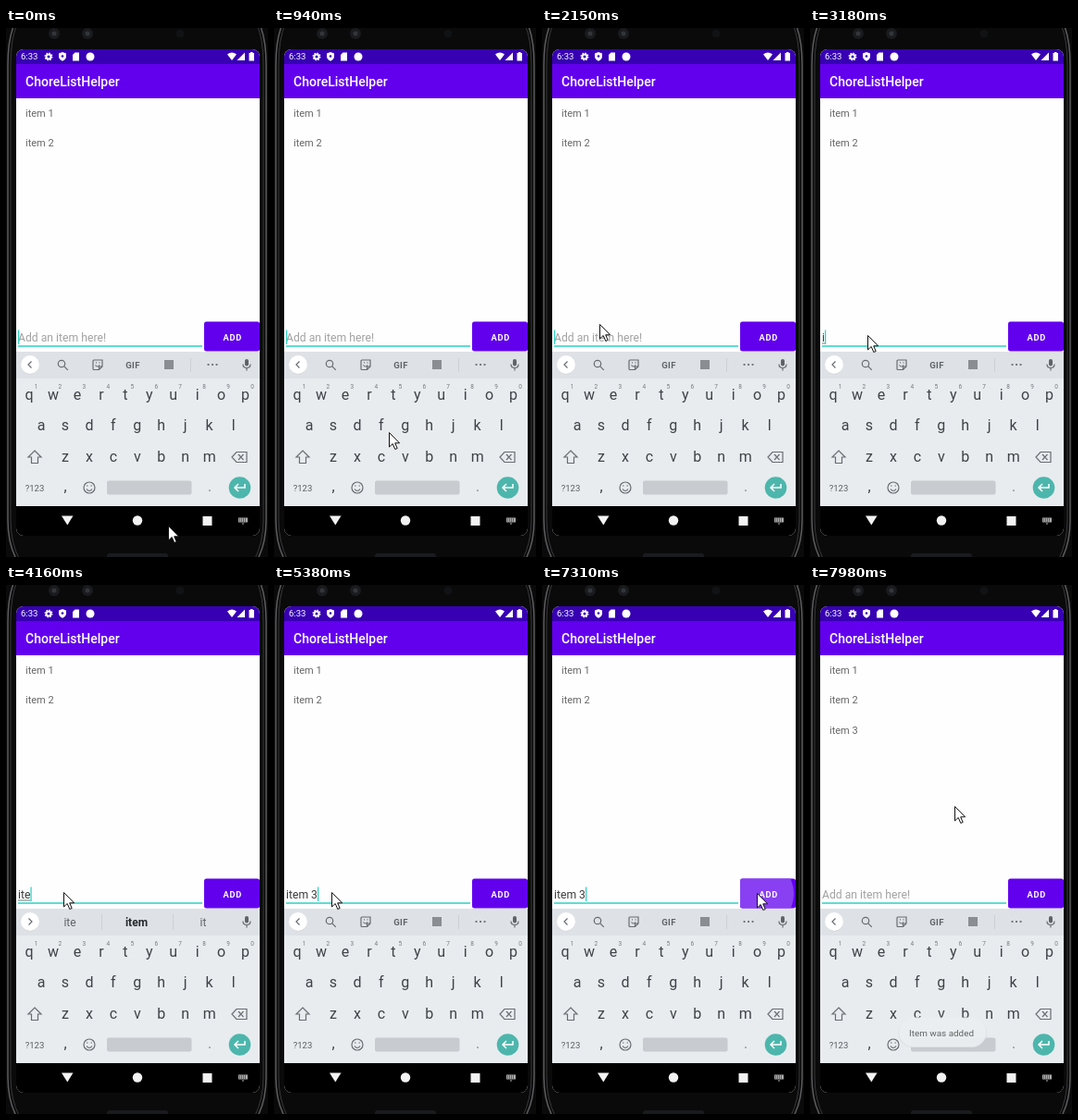
Animation, 283 px wide and 572 px high, one loop 8000 ms. Source, as an HTML page:

```html
<!DOCTYPE html>
<html lang="en">
<head>
<meta charset="utf-8">
<style>
html, body { margin: 0; width: 100%; height: 100%; overflow: hidden; background: #000 }
svg { display: block; width: 283px; height: 572px; font-family: Roboto, sans-serif }
.icon { fill: none; stroke: #686c71; stroke-width: 1.2 }
.key { font-size: 16px; fill: #3f4347; text-anchor: middle }
.mid { text-anchor: middle }
</style>
</head>
<body>
<svg viewBox="0 0 283 572">
  <defs>
    <clipPath id="screen"><rect x="11" y="23" width="263" height="526" rx="8"/></clipPath>
    <clipPath id="button"><rect x="214" y="317.500" width="60" height="32" rx="2.500"/></clipPath>
    <g id="edge" fill="none">
      <path d="M9-4Q2 12 2 40V532Q2 558 12 576" stroke="#5c5c5e" stroke-width="1.500"/>
      <path d="M12-4Q5 12 5 40V532Q5 556 15 576" stroke="#39393b"/>
    </g>
  </defs>

  <!-- phone body -->
  <path fill="#0a0a0b" d="M0 0h283v572H0z"/>
  <use href="#edge"/><use href="#edge" transform="matrix(-1 0 0 1 283 0)"/>
  <g fill="#1a1b1e">
    <circle cx="52" cy="6" r="6"/><circle cx="88" cy="6" r="6"/><circle cx="188" cy="6" r="4.500" fill="#111214"/>
    <rect x="109" y="568" width="66" height="9" rx="3"/>
  </g>
  <g fill="#33353a"><circle cx="52" cy="6" r="2.500"/><circle cx="88" cy="6" r="2.500"/></g>

  <g clip-path="url(#screen)">
    <path fill="#fefefe" d="M11 23h263v526H11z"/>
    <path fill="#3700b3" d="M11 23h263v16H11z"/>
    <path fill="#6200ee" d="M11 39h263v37H11z"/>
    <path fill="#e8ecef" d="M11 350h263v167H11z"/>
    <path fill="#dee2e6" d="M11 350h263v29H11z"/>
    <path fill="#000" d="M11 517h263v32H11z"/>

    <!-- status and title bar -->
    <g fill="#fff">
      <text x="16" y="34.300" font-size="9.500">6:33</text>
      <circle cx="46" cy="31" r="2.500" fill="none" stroke="#fff" stroke-width="2"/>
      <circle cx="46" cy="31" r="3.900" fill="none" stroke="#fff" stroke-width="1.200" stroke-dasharray="1.530"/>
      <path d="M61 26l4 1.500v3q0 3.500-4 5.300-4-1.800-4-5.300v-3z"/>
      <circle cx="61" cy="30.500" r="1.300" fill="#3700b3"/>
      <path d="M74.500 26.500h4.500v9h-7v-6.500z"/>
      <circle cx="91" cy="31" r="4.500"/>
      <path d="M239 28.500q5-4 10 0l-5 6.500zM258 26.500v8.500h-8.500zM264 26h2.500v1h1.500v8.500h-5.500v-8.500h1.500z"/>
      <text x="21" y="63" font-size="14" font-weight="500">ChoreListHelper</text>
    </g>

    <g font-size="11" fill="#666">
      <text x="21" y="96">item 1</text>
      <text x="21" y="128.300">item 2</text>
      <text x="21" y="160.500" id="added">item 3</text>
    </g>

    <!-- input row -->
    <path fill="#5fddd2" d="M13 343h199v2H13z"/>
    <text id="hint" x="13" y="339" font-size="12.200" fill="#a2a2a2">Add an item here!</text>
    <text id="typed" x="13" y="339" font-size="12.200" fill="#3c3c3c" xml:space="preserve"></text>
    <path id="underline" stroke="#555" stroke-width=".8"/>
    <path id="caret" fill="#35d3c4" d="M0 326.500h1.300v15.500H0z"/>
    <g clip-path="url(#button)">
      <path fill="#6200ee" d="M214 317h60v33h-60z"/>
      <circle id="ripple" cx="234" cy="334" fill="#8840f2"/>
    </g>
    <text x="244.700" y="337.500" class="mid" font-size="9.300" font-weight="700" letter-spacing=".7" fill="#fff">ADD</text>

    <!-- suggestion strip -->
    <circle cx="26" cy="364.500" r="10" fill="#c9cdd1"/>
    <circle cx="26" cy="364" r="10" fill="#fff"/>
    <path id="chevron" class="icon"/>
    <g id="tools" class="icon">
      <circle cx="60" cy="363" r="3.700"/><path d="M62.800 365.800l4 4"/>
      <path d="M95 359h9v7l-3.500 3.500H95q-1 0-1-1V360q0-1 1-1zM104 366h-3.500v3.500M96.500 364.500q2.300 3 4.600 0M97 361.800h1M100.500 361.800h1"/>
      <text x="137" y="367.500" class="mid" font-size="9.500" font-weight="700" letter-spacing=".4" fill="#5f6368" stroke="none">GIF</text>
      <path d="M171 359h10v10h-10z" fill="#8a8e93" stroke="none"/>
      <path d="M199.500 357v15" stroke="#cdd1d5" stroke-width="1"/>
      <path d="M218.500 364h.1M223 364h.1M227.500 364h.1" stroke-width="2.200" stroke-linecap="round"/>
    </g>
    <g id="words" class="mid" font-size="12" fill="#5f6368">
      <path d="M103.500 356v17M180.500 356v17" stroke="#cdd1d5"/>
      <text x="69" y="369"></text><text x="141" y="369" font-weight="700" fill="#26292c"></text><text x="213" y="369"></text>
    </g>
    <rect x="258" y="358" width="4" height="7.500" rx="2" fill="#5f6368"/>
    <path class="icon" d="M256 363.500q0 4 4 4t4-4M260 367.500v3"/>

    <!-- keyboard -->
    <g id="keys"></g>
    <g class="icon">
      <path d="M31 457l7 7h-3.500v6.500h-7V464H24z"/>
      <path d="M249 458.500h11v11h-11l-5-5.500zM251 461l5.500 6M256.500 461l-5.500 6"/>
      <circle cx="90" cy="497" r="6"/><path d="M87 498.500q3 4 6 0M87 495h1.500M91.500 495H93"/>
    </g>
    <text x="31" y="500.500" class="mid" font-size="9.500" fill="#5a5e62">?123</text>
    <text x="64" y="501" class="key">,</text>
    <text x="220" y="501" class="key" fill-opacity=".6">.</text>
    <rect x="109" y="489.500" width="91.500" height="15" rx="2" fill="#c8cbcf"/>
    <circle cx="252.500" cy="497" r="11.800" fill="#4db6ac"/>
    <path d="M258 493v4h-10.500M251 493l-4 4 4 4" fill="none" stroke="#fff" stroke-width="1.500"/>

    <!-- navigation bar -->
    <g fill="#f2f2f2">
      <path d="M60 527.500h12.500l-6.200 10z"/><circle cx="142" cy="532.500" r="5.200"/><path d="M212.500 528h10v10h-10z"/>
      <path d="M251 529.500h10v5h-10zM254.500 535.500h3l-1.500 1.500z" fill="#aaa"/>
      <path d="M252 531h8M252 533h8" stroke="#222" stroke-dasharray="1"/>
    </g>

    <g id="toast">
      <rect x="95.500" y="468" width="95.500" height="32" rx="16" fill="#d5d9dc"/>
      <rect x="96" y="467.500" width="94.500" height="32" rx="16" fill="#eceff1"/>
      <text x="142" y="488" class="mid" font-size="9.900" fill="#55585b">Item was added</text>
    </g>
  </g>
  <path id="pointer" d="M.500.500V16l3.700-3.500 2.600 6 2.400-1-2.500-5.700h4.900z" fill="#fff" stroke="#111"/>
</svg>
<script>
const LOOP = 8000, TICK = 134.2;
const PRESS = 7310, SUBMIT = 7580;
const STRIP_OPEN = 3710, STRIP_CLOSE = 5140;
const message = "item 3", keyTimes = [3180, 3860, 4160, 4310, 4740, 5140];

// Key points of the pointer: time, x, y.
const route = [
  [200, 175, 538], [550, 129, 456], [800, 129, 456], [930, 125, 438], [2010, 67, 308],
  [2140, 62, 320], [2400, 62, 332], [5800, 62, 332], [6480, 185, 355], [6780, 232, 333],
  [SUBMIT, 232, 333], [7900, 156, 239]];

const $ = id => document.getElementById(id);
const clamp = (v, max = 1) => Math.min(max, Math.max(0, v));
const show = (id, on) => $(id).setAttribute("visibility", on ? "visible" : "hidden");
const move = (id, x, y = 0) => $(id).setAttribute("transform", `translate(${x} ${y})`);

$("keys").innerHTML = ["qwertyuiop", "asdfghjkl", "zxcvbnm"].map((letters, row) =>
  [...letters].map((c, i) => {
    const x = 25 + 13 * (row && 2 * row - 1) + 25.95 * i;
    const digit = row ? "" : `<text class="mid" x="${x + 7.5}" y="390" font-size="6.500" fill="#777b7f">${(i + 1) % 10}</text>`;
    return `<text class="key" x="${x}" y="${402 + 33.3 * row}">${c}</text>${digit}`;
  }).join("")).join("");

function pointerAt(t) {
  const next = route.findIndex(point => point[0] > t);
  if (next <= 0) return (next ? route.at(-1) : route[0]).slice(1);
  const [from, to] = [route[next - 1], route[next]];
  const k = (t - from[0]) / (to[0] - from[0]);
  return [1, 2].map(i => Math.round(from[i] + k * (to[i] - from[i])));
}

function draw(t) {
  move("pointer", ...pointerAt(Math.floor(t / TICK) * TICK));

  const submitted = t >= SUBMIT;
  const pressed = keyTimes.filter(time => time <= t);
  const text = submitted ? "" : message.slice(0, pressed.length);
  $("typed").textContent = text;
  const width = text ? $("typed").getComputedTextLength() : 0;
  show("hint", !text);
  show("added", submitted);
  show("underline", text && !text.includes(" "));
  $("underline").setAttribute("d", `M13 341h${width}`);

  // Typing restarts the blinking of the caret.
  const lastEdit = pressed.at(-1) ?? -250;
  show("caret", !submitted && (t - lastEdit) % 1000 < 500);
  move("caret", 13 + width);

  const suggesting = t >= STRIP_OPEN && t < STRIP_CLOSE;
  show("tools", !suggesting);
  show("words", suggesting);
  const words = [text.trim(), "item", text.slice(0, 2)];
  $("words").querySelectorAll("text").forEach((el, i) => el.textContent = words[i]);
  $("chevron").setAttribute("d", suggesting ? "M24.500 360.500l3.500 3.500-3.500 3.500" : "M27.500 360.500l-3.500 3.500 3.500 3.500");

  $("ripple").setAttribute("r", t >= PRESS && !submitted ? 38 + (t - PRESS) * .06 : 0);
  $("toast").setAttribute("opacity", clamp((t - SUBMIT) / 400, .92));
}

function frame() {
  draw(performance.now() % LOOP);
  requestAnimationFrame(frame);
}
frame();
</script>
</body>
</html>
```
